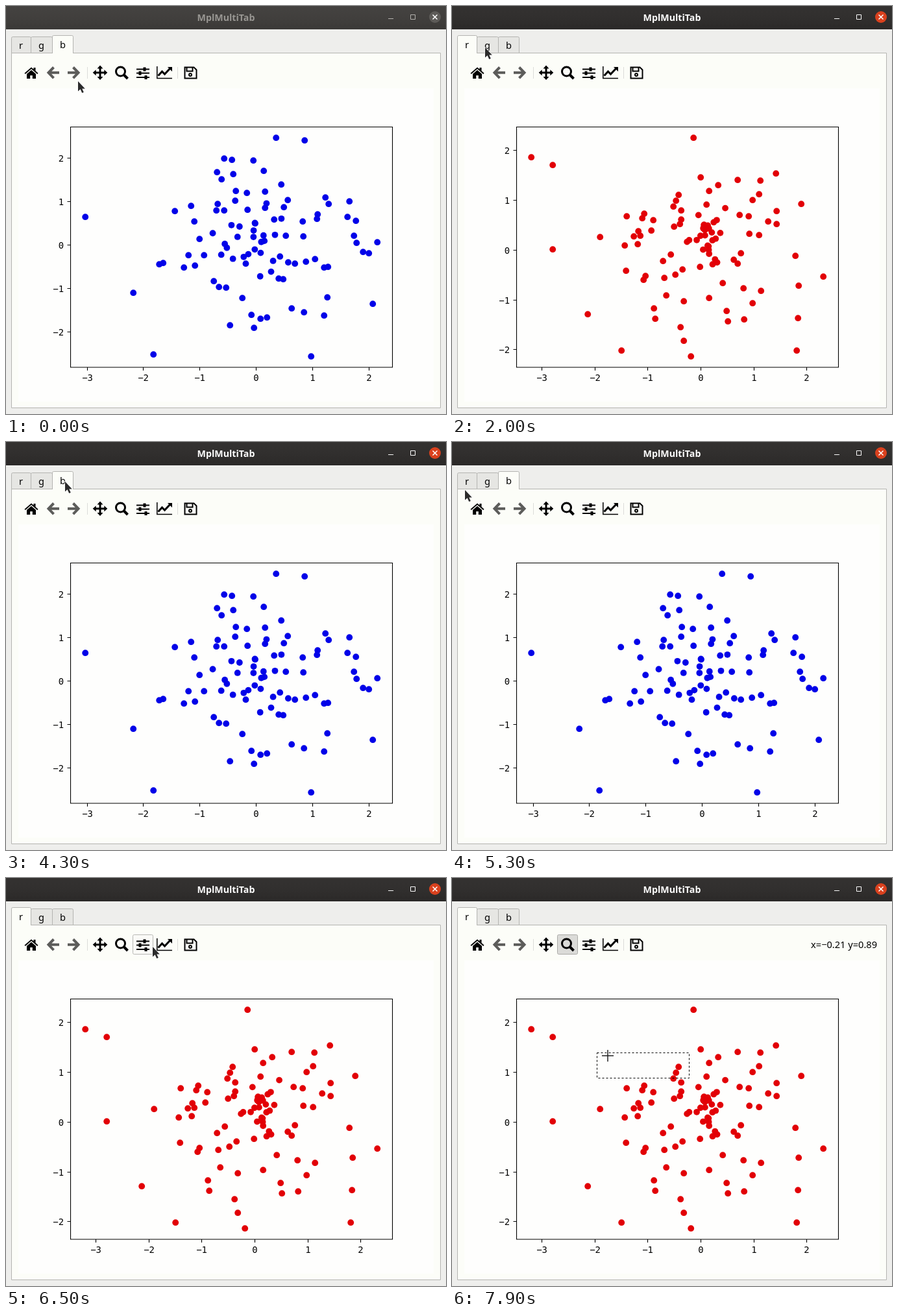
Animation of 678 by 629 pixels, one loop 8 s. Source, as an HTML page:

```html
<!DOCTYPE html>
<html lang="en">
<head>
<meta charset="utf-8">
<title>MplMultiTab</title>
<style>
html, body { margin: 0; width: 100%; height: 100%; overflow: hidden; background: #eeeeec; }
svg { display: block; }
text { font: 14.6px "Noto Sans", "Open Sans", sans-serif; text-anchor: middle; }
.plot text { font: 13.9px "DejaVu Sans Mono", monospace; }
.plot .y { text-anchor: end; }
#name { font: bold 14.2px "Open Sans", "Noto Sans", sans-serif; }
#coords { text-anchor: end; }
</style>
</head>
<body>
<svg id="stage" width="678" height="629" viewBox="0 0 678 629">
  <defs>
    <linearGradient id="shade" x2="0" y2="1">
      <stop stop-color="#fff" stop-opacity=".03"/><stop offset="1" stop-color="#000" stop-opacity=".06"/>
    </linearGradient>
  </defs>
  <path fill="#eeeeec" d="M0 0H678V629H0z"/>
  <path id="bar" d="M0 0H678V36H0z"/>
  <path fill="url(#shade)" d="M0 0H678V36H0z"/>
  <text id="name" x="339" y="23">MplMultiTab</text>
  <g id="winButtons" fill="none"><path d="M589 19.5h8"/><path d="M623.5 13.5h7v7h-7z"/></g>
  <circle id="close" cx="661" cy="17" r="9"/>
  <path d="M657.5 13.5l7 7m0-7l-7 7" stroke="#fff" stroke-width="1.5"/>

  <path d="M8.5 72.5H669.5V619.5H8.5z" fill="#fcfdf8" stroke="#b4b4b1"/>
  <path d="M19 127H659V610H19z" fill="#fefefd"/>
  <g id="tabs"></g>

  <rect id="button" y="87.5" width="31" height="30" rx="2"/>
  <path d="M125.5 94V112M264.5 94V112" stroke="#dcdcd9"/>
  <path d="M28.5 103.5L39 94.5l3.5 3V95h3v5l4 3.5-1.3 1.5L39 97l-9.2 8zM32 104.8l7-6 7 6V112h-5.2v-5h-3.6v5H32z"/>
  <g fill="none" stroke="#5c5c5a" stroke-width="4">
    <path d="M73.5 94.5L65.500 102.800l8 8.300M66 102.800H82"/>
    <path d="M103.500 94.500l8 8.300-8 8.300M111 102.800H95"/>
  </g>
  <path d="M145 91.500l4.500 5H146.500v4.800h4.800v-3l5 4.500-5 4.500v-3h-4.800v4.800h3l-4.500 5-4.500-5h3v-4.800h-4.800v3l-5-4.500 5-4.500v3h4.800v-4.800h-3z"/>
  <g fill="none" stroke="#000">
    <circle cx="176.500" cy="101" r="7" stroke-width="3"/>
    <path d="M181.500 106l6 6" stroke-width="4"/>
    <path d="M201 97.500H221M201 103.500H221M201 110H221" stroke-width="2"/>
    <path d="M213.500 94.500v6M206.500 100.500v6M215.500 107v6" stroke-width="4"/>
    <path d="M232.800 93V111.500H256" stroke-width="1.500"/>
    <path d="M234.500 107.500l6-6.500 4 4 8.500-9" stroke-width="3"/>
    <path d="M275.500 94.500h14l4 4v13h-18z" stroke-width="2"/>
    <path d="M278.500 95v5.500h9V95" stroke-width="2"/>
    <circle cx="284" cy="106" r="2" stroke-width="2"/>
  </g>
  <path d="M249 94h7v7z"/>
  <text id="coords" x="655" y="108"></text>

  <g id="plots"></g>
  <rect id="band" x="223.5" y="269.5" fill="none" stroke="#000" stroke-dasharray="3 3"/>
  <path id="arrow" d="M0 0V15.500L3.600 12.300 6.200 18 8.800 16.900 6.300 11.400H10.800z" fill="#2b2b2b" stroke="#fff" stroke-width="1.200" paint-order="stroke"/>
  <g id="cross" fill="none">
    <path d="M-9 0H9M0-9V9" stroke="#fff" stroke-width="3.500"/>
    <path d="M-9 0H9M0-9V9" stroke="#222" stroke-width="1.500"/>
  </g>
</svg>
<script>
const $ = id => document.getElementById(id);
const set = (el, attrs) => { for (const k in attrs) el.setAttribute(k, attrs[k]); };
const show = (el, on) => { el.style.display = on ? "" : "none"; };

// x0, y0: pixel of the data origin; sx, sy: pixels per unit.
// pts: the spread-out points; core: [count, x, y, spreadX, spreadY, seed] of the dense middle.
const series = {
  r: { colour: "#e20006", x0: 383.5, sx: 81.6, xs: [-3, 2], y0: 376.3, sy: 76.8, ys: [-2, 2], step: 1,
    core: [27, 397, 358, 15, 20, 7],
    pts: [122,233, 155,245, 372,203, 383,264, 410,276, 440,268, 475,269, 499,258, 473,290, 463,299,
      538,305, 396,285, 349,291, 345,300, 341,309, 353,315, 392,306, 269,324, 296,320, 293,327,
      310,330, 353,329, 351,336, 342,340, 307,346, 287,347, 290,354, 280,355, 286,367, 266,369,
      228,356, 155,375, 382,402, 443,322, 457,324, 500,316, 487,332, 500,336, 458,351, 473,353,
      445,381, 434,391, 440,397, 529,385, 572,417, 534,431, 476,439, 449,435, 417,427, 337,383,
      325,393, 355,406, 344,414, 327,419, 298,416, 295,422, 268,408, 330,446, 311,466, 313,482,
      357,455, 352,495, 357,516, 368,540, 261,531, 209,475, 396,450, 463,458, 423,470, 425,486,
      450,483, 533,481, 531,531] },
  g: { colour: "#0a950a", x0: 294, sx: 88.9, xs: [-2, 3], y0: 384.3, sy: 86.2, ys: [-2, 2], step: .5,
    core: [24, 305, 382, 24, 18, 3],
    pts: [242,203, 348,206, 418,211, 381,221, 305,235, 324,238, 341,244, 392,242, 396,259, 244,267,
      241,271, 572,278, 146,297, 235,296, 122,333, 166,338, 199,329, 210,315, 211,338, 243,336,
      261,322, 275,314, 289,319, 283,325, 293,332, 323,317, 334,318, 325,329, 333,330, 428,330,
      376,337, 390,340, 373,347, 380,358, 382,373, 408,352, 431,361, 446,367, 484,388, 500,389,
      168,362, 185,375, 132,406, 216,379, 251,375, 348,420, 356,423, 392,408, 401,405, 225,426,
      261,438, 283,433, 214,457, 223,463, 164,481, 222,501, 239,495, 244,501, 245,540, 294,464,
      300,465, 316,501, 332,482, 335,492, 343,492, 355,492, 337,531, 347,537, 363,533, 384,512,
      392,517, 369,457, 427,451, 495,475] },
  b: { colour: "#0202e8", x0: 385.5, sx: 86.8, xs: [-3, 2], y0: 368.5, sy: 67, ys: [-2, 2], step: 1,
    core: [27, 377, 366, 30, 24, 5],
    pts: [416,203, 460,207, 336,235, 348,237, 381,238, 325,256, 332,267, 350,259, 397,254, 354,285,
      353,300, 371,288, 399,286, 424,275, 434,299, 492,295, 497,305, 529,301, 122,325, 260,316,
      285,308, 290,332, 326,305, 324,315, 336,315, 372,314, 399,311, 428,310, 413,329, 457,332,
      480,321, 479,328, 526,325, 539,331, 431,354, 458,355, 536,354, 540,365, 572,364, 550,379,
      559,381, 298,359, 281,384, 305,384, 236,398, 242,396, 274,403, 291,400, 196,442, 227,537,
      422,386, 445,397, 462,394, 476,390, 490,403, 496,402, 320,424, 328,433, 339,434, 364,450,
      420,420, 427,421, 495,449, 440,466, 459,472, 490,477, 565,459, 378,476, 392,482, 402,480,
      382,496, 345,492, 470,540] }
};
const tabBox = { r: [8.5, 30, 23], g: [38.5, 33, 54.5], b: [71.5, 32, 87.5] };

function seeded(seed) {
  return () => (seed = (seed * 16807) % 2147483647) / 2147483647;
}
const num = (v, digits) => v.toFixed(digits).replace("-", "\u2212");

function plot(s) {
  let out = "";
  const dot = (x, y) => { out += `<circle cx="${x + .2}" cy="${y + .2}" r="4.9"/>`; };
  for (let i = 0; i < s.pts.length; i += 2) dot(s.pts[i], s.pts[i + 1]);
  const [count, cx, cy, dx, dy, seed] = s.core, rnd = seeded(seed * 7919);
  const normal = () => (rnd() + rnd() + rnd() - 1.5) * 2;
  for (let i = 0; i < count; i++) dot(cx + dx * normal(), cy + dy * normal());
  out = `<g fill="${s.colour}">${out}</g>`;
  let ticks = "M99.5 186.500H595.500V557H99.500z";
  for (let v = s.xs[0]; v <= s.xs[1]; v++) {
    const x = Math.floor(s.x0 + v * s.sx) + .5;
    ticks += `M${x} 557v5`;
    out += `<text x="${x}" y="578">${num(v, 0)}</text>`;
  }
  for (let v = s.ys[0]; v <= s.ys[1]; v += s.step) {
    const y = Math.floor(s.y0 - v * s.sy) + .5;
    ticks += `M99.500 ${y}h-5`;
    out += `<text class="y" x="89" y="${y + 5}">${num(v, s.step < 1 ? 1 : 0)}</text>`;
  }
  return out + `<path d="${ticks}" fill="none" stroke="#000" stroke-width="1.1"/>`;
}

for (const k in series) {
  $("plots").innerHTML += `<g class="plot" id="plot-${k}">${plot(series[k])}</g>`;
  $("tabs").innerHTML += `<g id="tab-${k}"><path stroke="#b4b4b1"/><text x="${tabBox[k][2]}">${k}</text></g>`;
}

// Steps hold until the next one.
const pointer = [
  [0, 111, 116], [200, 94, 112], [300, 67, 126],
  [900, 63, 119], [1000, 55, 106], [1100, 46, 92], [1200, 36, 77], [1300, 27, 64], [1400, 22, 55],
  [1700, 29, 62], [1900, 40, 67], [2000, 51, 64],
  [3600, 57, 63], [3700, 66, 61], [3800, 76, 60], [3900, 85, 60], [4000, 91, 61],
  [4800, 94, 66], [4900, 88, 71], [5000, 76, 74], [5100, 58, 74], [5200, 36, 74], [5300, 20, 74],
  [5400, 18, 72], [5500, 20, 69], [5600, 23, 67], [5800, 24, 67], [6000, 31, 68], [6100, 51, 73],
  [6300, 241, 111], [6400, 233, 109], [6500, 226, 106], [6600, 219, 104],
  [6800, 207, 102], [6900, 190, 102], [7000, 170, 101], [7100, 157, 100], [7200, 176, 101],
  [7500, 186, 135], [7600, 205, 200], [7700, 223, 269], [7800, 223, 269], [7900, 240, 274], [8000, 366, 308]
];
const tabAt = [[0, "b"], [1500, "r"], [3200, "g"], [4300, "b"], [5700, "r"]];
const hoverAt = [[0, 0], [6100, 195], [6300, 228], [6500, 195], [6900, 162], [7100, 129], [7200, 162]];
const stepAt = (steps, t) => steps.findLastIndex(s => s[0] <= t);

function drawTabs(active) {
  for (const k in tabBox) {
    const [x, w] = tabBox[k], on = k === active, tab = $("tab-" + k);
    const top = on ? 45.5 : 47.5, base = on ? 73 : 72.5;
    set(tab.firstChild, {
      d: `M${x} ${base}V${top + 2}q0-2 2-2h${w - 4}q2 0 2 2V${base}` + (on ? "" : "z"),
      fill: on ? "#fcfdf8" : "#e6e6e3"
    });
    set(tab.lastChild, { y: on ? 65 : 66 });
    show($("plot-" + k), on);
  }
}

function drawTitle(focus) {
  set($("bar"), { fill: focus ? "#2d2b2a" : "#3e3c3a" });
  set($("name"), { fill: focus ? "#fff" : "#989692" });
  set($("winButtons"), { stroke: focus ? "#fff" : "#b4b2ae" });
  set($("close"), { fill: focus ? "#d9411e" : "#5d5b58" });
}

function draw(t) {
  drawTitle(t >= 1500);
  drawTabs(tabAt[stepAt(tabAt, t)][1]);

  const pressed = t >= 7400;
  const left = hoverAt[stepAt(hoverAt, t)][1];
  show($("button"), left);
  set($("button"), { x: left + .5, fill: pressed ? "#dbdbd8" : "#fafaf7", stroke: pressed ? "#aaaaa7" : "#b8b8b5" });

  const i = stepAt(pointer, t), [, x, y] = pointer[i];
  const inPlot = t >= 7600;
  show($("arrow"), !inPlot);
  show($("cross"), inPlot);
  set($(inPlot ? "cross" : "arrow"), { transform: `translate(${x} ${y})` });

  // While zooming, the shown pointer trails the tool by one step.
  const [, mx, my] = pointer[Math.min(i + 1, pointer.length - 1)], s = series.r;
  $("coords").textContent = t < 7500 ? "" :
    `x=${num((mx - s.x0) / s.sx, 2)} y=${num((s.y0 - my) / s.sy, 2)}`;
  show($("band"), t >= 7800);
  set($("band"), { width: Math.max(0, mx - 224 + .5 | 0), height: Math.max(0, my - 269) });
}

const start = performance.now();
(function loop() {
  draw((performance.now() - start) % 8000);
  requestAnimationFrame(loop);
})();
</script>
</body>
</html>
```
